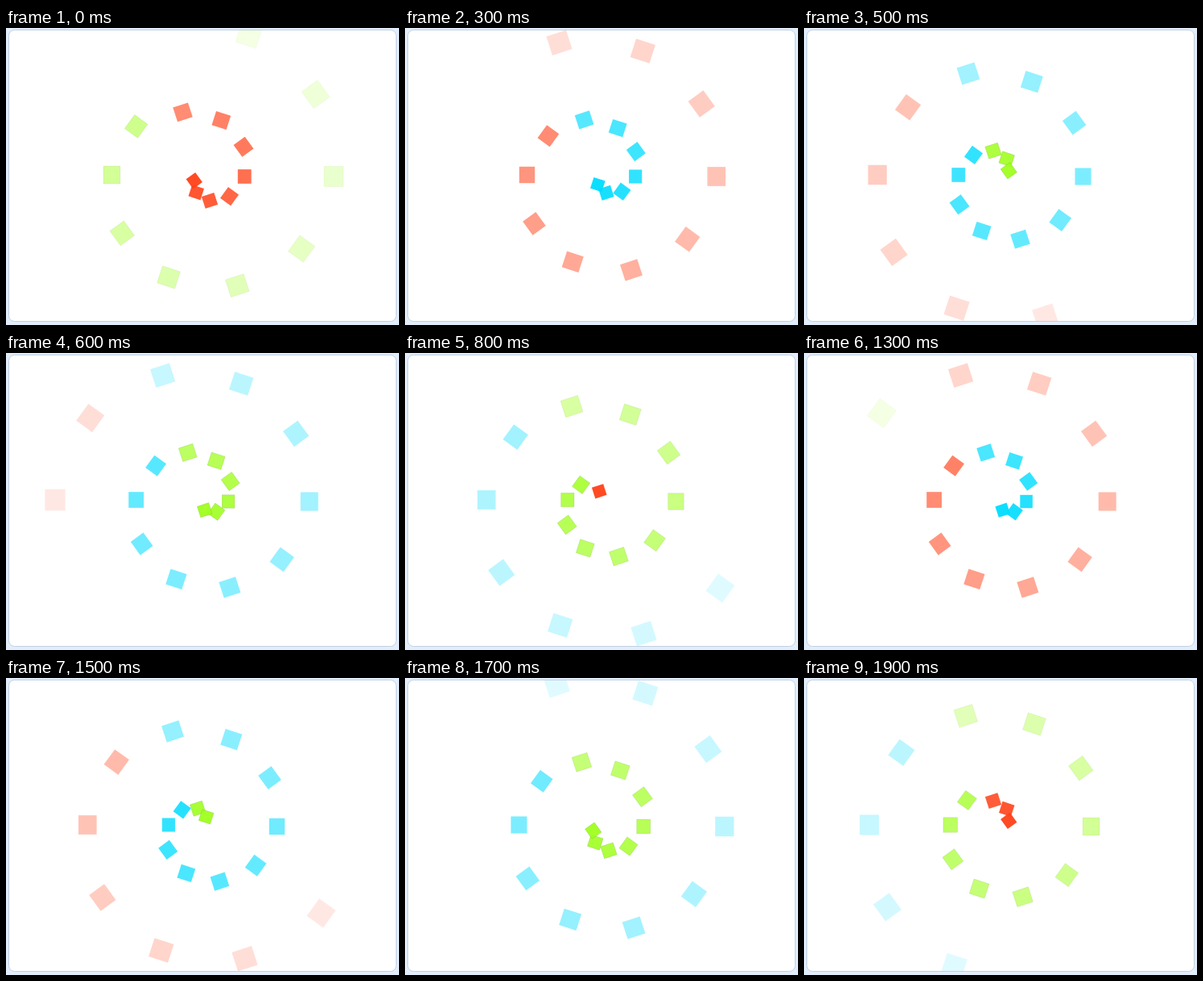
These frames come from a looping animation (488 px wide and 368 px high, 2 s). An HTML page with a canvas:

```html
<!DOCTYPE html>
<html lang="en">
<head>
<meta charset="utf-8">
<title>Spiral of squares</title>
<style>
  html, body { margin: 0; width: 100%; height: 100%; overflow: hidden; background: #e2eefc; }
  canvas { display: block; }
</style>
</head>
<body>
<canvas id="stage" width="488" height="368"></canvas>
<script>
const ctx = document.getElementById('stage').getContext('2d');

const LOOP = 2000, FRAME = 100, STEPS_PER_FRAME = 3;
const CYCLE = 31;      // emission steps until the colours repeat
const PAUSE = 22;      // the one step of a cycle that emits nothing
const LIFE = 18;       // steps a square stays visible
const CENTER = { x: 244, y: 183 };

const RED = '#ff4219', CYAN = '#00dcff', GREEN = '#a0ff20';

const mod = (a, n) => ((a % n) + n) % n;

function colorAt(slot) {
  if (slot < 2 || slot > PAUSE) return RED;
  return slot < 12 ? CYAN : GREEN;
}

// Each emitted square turns a tenth of a circle; the pause does not turn.
function angleAt(slot) {
  const count = slot > PAUSE ? slot - 1 : slot;
  return Math.PI + count * Math.PI / 5;
}

function drawSquare(slot, age) {
  const color = colorAt(slot);
  const w = 13.6 + 0.645 * age;
  const h = w * 1.05;
  const r = 1.9 + 10.06 * age;
  ctx.save();
  ctx.translate(CENTER.x, CENTER.y);
  ctx.rotate(angleAt(slot));
  ctx.globalAlpha = 1 - age / 20.5;
  ctx.fillStyle = color;
  ctx.fillRect(r - w / 2, 1 - h / 2, w, h);
  if (color === GREEN) {
    ctx.globalAlpha *= 0.5;
    ctx.strokeStyle = '#78b030';
    ctx.lineWidth = 0.6;
    ctx.strokeRect(r - w / 2, 1 - h / 2, w, h);
  }
  ctx.restore();
}

function drawPanel() {
  ctx.fillStyle = '#e2eefc';
  ctx.fillRect(0, 0, 488, 368);
  ctx.beginPath();
  ctx.roundRect(3.5, 2.5, 481, 361, 7);
  ctx.fillStyle = '#fff';
  ctx.fill();
  ctx.strokeStyle = '#c0d0e2';
  ctx.lineWidth = 1;
  ctx.stroke();
}

function draw(time) {
  const step = Math.floor((time % LOOP) / FRAME) * STEPS_PER_FRAME;
  drawPanel();
  ctx.save();
  ctx.beginPath();
  ctx.rect(4, 3, 480, 360);
  ctx.clip();
  for (let age = LIFE; age >= 1; age--) {
    const slot = mod(step - age, CYCLE);
    if (slot !== PAUSE) drawSquare(slot, age);
  }
  ctx.restore();
}

const start = performance.now();
function tick() {
  draw(performance.now() - start);
  requestAnimationFrame(tick);
}
tick();
</script>
</body>
</html>
```
